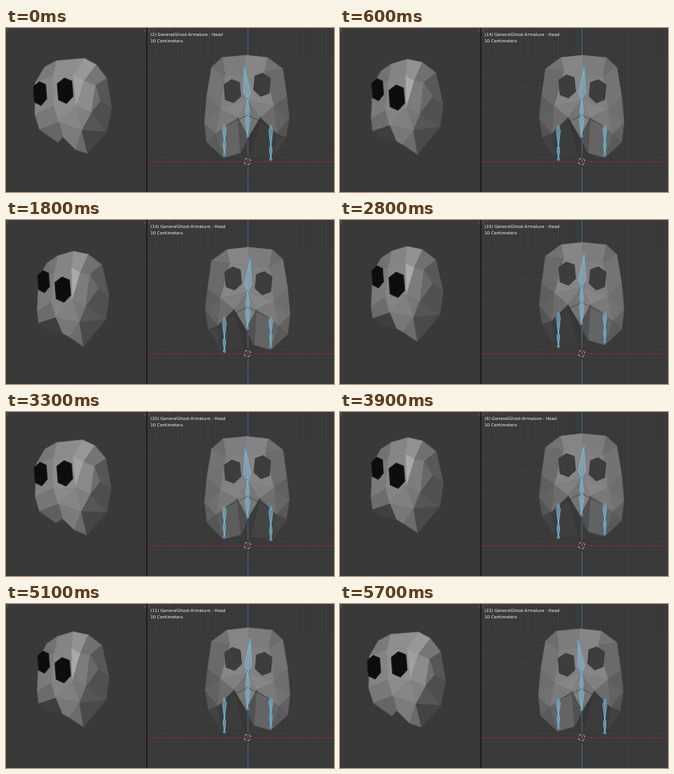
Write an HTML page with a canvas that moves like this. It is 410 px wide and 205 px high and loops after 5800 ms.

```html
<!DOCTYPE html>
<html lang="en">
<head>
<meta charset="utf-8">
<title>Ghost walk cycle</title>
<style>
html, body { margin: 0; width: 100%; height: 100%; overflow: hidden; background: #393939; }
canvas { display: block; width: 410px; height: 205px; }
</style>
</head>
<body>
<canvas id="stage"></canvas>
<script>
const W = 410, H = 205, LOOP = 5800, STEP = 100;
const canvas = document.getElementById('stage');
const ctx = canvas.getContext('2d');
const dpr = window.devicePixelRatio || 1;
canvas.width = W * dpr;
canvas.height = H * dpr;
ctx.scale(dpr, dpr);

const mix = (a, b, t) => a + (b - a) * t;
const ease = t => (1 - Math.cos(Math.PI * t)) / 2;
const gray = v => { const g = Math.round(v); return `rgb(${g},${g},${g})`; };

// Perspective view: x, y at the left lean, then x, y at the right lean
const SIDE = [
  [63,41,64,45], [98,38,84,39], [113,46,103,43], [126,63,120,56],
  [132,100,129,96], [126,130,125,124], [102,157,97,158], [87,152,79,146],
  [71,136,70,141], [65,143,50,137], [42,127,41,129], [36,108,39,114],
  [37,68,41,72], [48,49,51,54], [58,60,60,66], [84,58,82,60],
  [98,66,93,66], [112,72,105,68], [60,98,57,103], [88,98,83,100],
  [107,106,100,108], [66,118,62,122], [95,128,92,128], [118,92,116,86]
];
// Corner indices, shade at each lean
const SIDE_FACES = [
  ['0 1 15 14', 142, 132], ['13 0 14', 124, 116], ['1 2 16 15', 152, 146],
  ['2 3 17 16', 118, 112], ['3 4 23 17', 86, 88], ['12 13 14', 122, 112],
  ['12 14 18 11', 132, 122], ['14 15 19 18', 142, 134], ['15 16 19', 160, 170],
  ['16 17 20 19', 140, 124], ['17 23 20', 110, 104], ['23 4 5 20', 78, 80],
  ['11 18 21 10', 120, 108], ['18 19 21', 140, 132], ['19 20 22', 128, 118],
  ['19 22 21', 134, 128], ['21 22 7 8', 124, 120], ['10 21 8 9', 102, 62],
  ['22 6 7', 106, 108], ['20 5 22', 86, 86], ['5 6 22', 68, 74]
];

// Front view at the left lean; the other lean is its mirror image
const AXIS = 603;
const MIDS = [[300,34], [299,57], [301,90], [303,137]];
const PAIRS = [
  [270,37,327,37], [257,49,346,51], [251,85,351,86], [248,118,354,112],
  [251,143,350,137], [272,162,334,163], [293,156,305,160], [274,60,323,55],
  [268,102,335,98], [290,112,318,112], [262,132,338,132]
];
// m = centre point, p = paired point; shades of left and right half
const FRONT_FACES = [
  ['m0 p0 p7 m1', 124, 134], ['p0 p1 p7', 108, 114], ['p1 p2 p8 p7', 116, 106],
  ['m1 p7 p8 m2', 128, 134], ['p2 p3 p8', 110, 94], ['m2 p8 p9', 134, 128],
  ['p3 p4 p10', 98, 84], ['p3 p10 p8', 114, 98], ['p8 p10 p9', 122, 108],
  ['m2 p9 m3', 128, 116], ['p4 p5 p10', 90, 66], ['p10 p5 p6 p9', 100, 60],
  ['p9 p6 m3', 82, 54]
];
const HEX = [[-.5,-.28], [-.05,-.5], [.42,-.38], [.5,.22], [.08,.5], [-.42,.36]];

function poly(pts, fill, stroke = fill, width = 0.6) {
  ctx.beginPath();
  pts.forEach(([x, y]) => ctx.lineTo(x, y));
  ctx.closePath();
  ctx.fillStyle = fill;
  ctx.fill();
  ctx.strokeStyle = stroke;
  ctx.lineWidth = width;
  ctx.stroke();
}

function line(x1, y1, x2, y2, color, width = 1) {
  ctx.beginPath();
  ctx.moveTo(x1, y1);
  ctx.lineTo(x2, y2);
  ctx.strokeStyle = color;
  ctx.lineWidth = width;
  ctx.stroke();
}

function eye(x, y, w, h, fill, rim, flip = 1) {
  poly(HEX.map(([u, v]) => [x + u * w * flip, y + v * h]), fill, rim, 0.8);
}

// Walk frame 1..24; playback gains and drops a few frames
function walkFrame(i) {
  let n = 2 + 2 * i;
  if (i >= 34) n += 1;
  if (i >= 43) n += 2;
  if (i >= 52) n -= 1;
  return (n - 1) % 24 + 1;
}

const BOB = [0, -7, 0.2, -3.5];
function pose(n) {
  const u = (n - 2.5 + 24) % 24 / 6, k = Math.floor(u);
  const swing = Math.cos(n / 24 * 2 * Math.PI) * 1.25;
  return {
    lean: (1 - Math.max(-1, Math.min(1, swing))) / 2,
    bob: mix(BOB[k], BOB[(k + 1) % 4], ease(u - k))
  };
}

function background() {
  ctx.fillStyle = '#393939';
  ctx.fillRect(0, 0, W, H);
  const gap = 5.8;
  for (let k = -22; k <= 29; k++) {
    const color = k % 10 ? '#404040' : '#464646';
    const x = 302 + k * gap, y = 167 + k * gap;
    if (x > 177) line(x, 0, x, H, color, 0.6);
    line(177, y, W, y, color, 0.6);
  }
  line(177, 167, W, 167, '#7b303c');
  line(302.5, 0, 302.5, H, '#40638f');
  ctx.fillStyle = '#202020';
  ctx.fillRect(175, 0, 2, H);
  for (const x of [1, 173, 178]) {
    line(x, 1.5, x + 1.5, 3, '#888', 0.6);
    line(x + 1.5, 3, x, 4.5, '#888', 0.6);
  }
}

function sideView({ lean, bob }) {
  const pts = SIDE.map(([ax, ay, bx, by]) => [mix(ax, bx, lean), mix(ay, by, lean) + bob]);
  for (const [ids, a, b] of SIDE_FACES) {
    poly(ids.split(' ').map(i => pts[i]), gray(mix(a, b, lean)));
  }
  eye(mix(42.5, 47, lean), mix(82, 77, lean) + bob, mix(17, 15, lean), mix(30, 28, lean), '#0d0d0d', '#1b1b1b');
  eye(mix(74, 71, lean), mix(78.5, 87, lean) + bob, 20, 32, '#0d0d0d', '#1b1b1b');
}

function frontView({ lean, bob }) {
  const point = (id, right) => {
    const i = +id.slice(1);
    if (id[0] === 'm') {
      const [x, y] = MIDS[i];
      return [mix(x, AXIS - x, lean), y + bob];
    }
    const [lx, ly, rx, ry] = PAIRS[i];
    return right
      ? [mix(rx, AXIS - lx, lean), mix(ry, ly, lean) + bob]
      : [mix(lx, AXIS - rx, lean), mix(ly, ry, lean) + bob];
  };
  for (const [ids, l, r] of FRONT_FACES) {
    const names = ids.split(' ');
    poly(names.map(id => point(id, false)), gray(mix(l, r, lean)));
    poly(names.map(id => point(id, true)), gray(mix(r, l, lean)));
  }
  eye(mix(283, 284, lean), mix(79, 73, lean) + bob, 21, 29, '#3d3d3d', '#343434');
  eye(mix(320, 322, lean), mix(71, 79, lean) + bob, 21, 29, '#3d3d3d', '#343434', -1);
}

function bone(x1, y1, x2, y2, w) {
  const mx = mix(x1, x2, 0.18), my = mix(y1, y2, 0.18);
  const edge = '#72bfe5';
  poly([[x1, y1], [mx - w, my], [x2, y2], [mx + w, my]], 'rgba(140,175,195,.5)', edge, 0.8);
  line(x1, y1, x2, y2, edge, 0.6);
  for (const [x, y] of [[x1, y1], [x2, y2]]) {
    ctx.beginPath();
    ctx.arc(x, y, 1.5, 0, 7);
    ctx.fillStyle = '#55798d';
    ctx.fill();
    ctx.strokeStyle = edge;
    ctx.lineWidth = 0.7;
    ctx.stroke();
  }
}

function armature({ lean, bob }) {
  const y = v => v + bob;
  ctx.setLineDash([2, 1]);
  line(302, y(109), 273, y(123), '#2b2b2b', 0.8);
  line(302, y(109), 331, y(123), '#2b2b2b', 0.8);
  ctx.setLineDash([]);
  bone(302, y(109), 302, y(135), 3);
  bone(302, y(109), 302, y(88), 2.5);
  bone(302, y(88), mix(298, 305, lean), y(50), 4.5);
  for (const [x, t] of [[273, lean], [331, 1 - lean]]) {
    const knee = y(mix(143, 150, t));
    bone(x, y(123), x, knee, 2.4);
    bone(x, knee, x, y(mix(158, 164, t)), 1.7);
  }
}

function cursor() {
  for (let k = 0; k < 8; k++) {
    ctx.beginPath();
    ctx.arc(302, 167, 4, k * Math.PI / 4, (k + 1) * Math.PI / 4);
    ctx.strokeStyle = k % 2 ? '#e8e0e0' : '#d84444';
    ctx.lineWidth = 1;
    ctx.stroke();
  }
  for (const [dx, dy] of [[1, 0], [-1, 0], [0, 1], [0, -1]]) {
    line(302 + dx * 2, 167 + dy * 2, 302 + dx * 7, 167 + dy * 7, '#151515', 0.8);
  }
}

function labels(n) {
  ctx.font = '5.25px "DejaVu Sans", sans-serif';
  ctx.textBaseline = 'alphabetic';
  const put = (text, y, color) => {
    ctx.fillStyle = color;
    ctx.fillText(text, 180.5, y);
  };
  put('fps: 22.50', 1.8, '#c22727');
  put(`(${n}) GeneralGhost-Armature : Head`, 10, n % 6 === 1 ? '#e6e02a' : '#f0f0f0');
  put('10 Centimeters', 18, '#f0f0f0');
}

function draw(ms) {
  const n = walkFrame(Math.floor(ms % LOOP / STEP));
  const p = pose(n);
  background();
  sideView(p);
  frontView(p);
  armature(p);
  cursor();
  labels(n);
}

let start = null;
function tick(now) {
  if (start === null) start = now;
  draw(now - start);
  requestAnimationFrame(tick);
}
draw(0);
requestAnimationFrame(tick);
</script>
</body>
</html>
```
